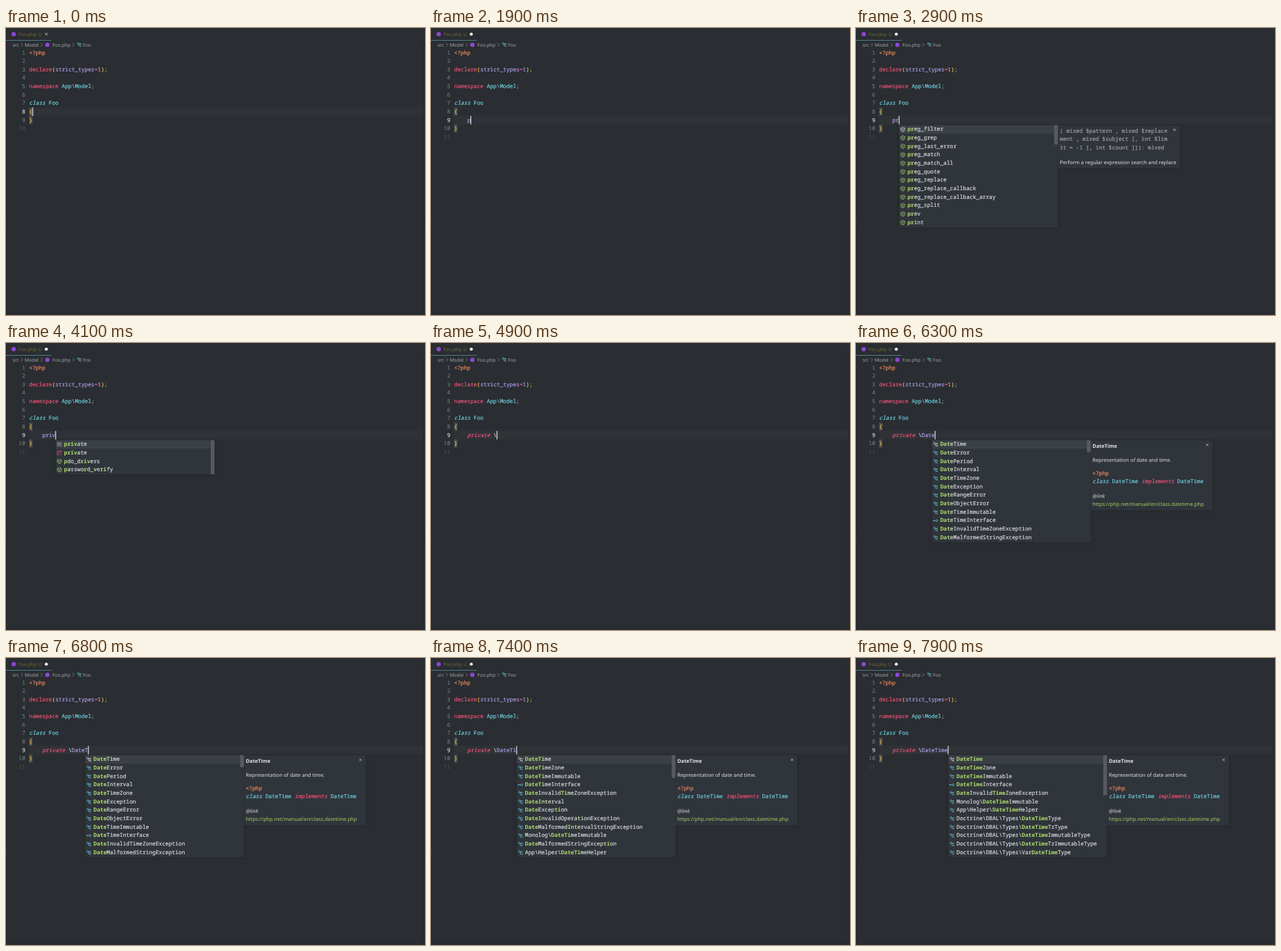
These frames come from a looping animation (626 by 430 pixels, 8 s). An HTML page:

```html
<!DOCTYPE html>
<html lang="en">
<head>
<meta charset="utf-8">
<title>Code completion</title>
<style>
html, body { margin: 0; width: 100%; height: 100%; overflow: hidden; background: #2a2d31; }
svg { display: block; width: 626px; height: 430px; }
text { white-space: pre; text-rendering: geometricPrecision; font: 8.15px "Noto Sans Mono", "DejaVu Sans Mono", monospace; font-variant-ligatures: none; }
tspan { fill: currentColor; stroke: currentColor; stroke-width: .16px; }
.ui { font: 7px "Noto Sans", "Open Sans", sans-serif; }
.doc { font: 7.64px "Noto Sans", "Open Sans", sans-serif; }
.ui tspan, .doc tspan { stroke: none; }
.end { text-anchor: end; }
.r { color: #f4527a; } .R { color: #f4527a; font-style: italic; }
.c { color: #6fd3e3; } .C { color: #6fd3e3; font-style: italic; }
.p { color: #b3a0f2; } .y { color: #f5c84c; } .o { color: #f58f62; }
.d { color: #a3a6a9; } .w { color: #dfe0e1; } .W { color: #e4e5e6; font-weight: bold; }
.I { color: #d3d5d7; font-style: italic; }
.g { color: #a5cf62; } .G { color: #aedd68; font-weight: bold; stroke: none; }
.n { color: #71757a; } .N { color: #d8d9da; } .f { color: #484c50; }
.t { color: #756a35; }
.icon { fill: none; stroke-width: .75; }
.shade { filter: drop-shadow(0 0 2px rgba(0, 0, 0, .18)); }
</style>
</head>
<body>
<svg viewBox="0 0 626 430">
  <g id="frame"></g>
  <g id="scene"></g>
  <rect id="caret" width="1.1" height="12.8" fill="#f4f4f4"/>
  <g id="popup"></g>
</svg>
<script>
const LOOP = 8000, CHAR = 4.89, LEFT = 34.6, LINE = 12.65, ROW = 12.69, LIST_W = 237, DOC_W = 182;
const el = id => document.getElementById(id);
const lineY = n => 36.7 + (n - 1) * LINE;
const rect = (x, y, w, h, fill) => `<rect x="${x}" y="${y}" width="${w}" height="${h}" fill="${fill}"/>`;
const circle = (x, y, r, fill) => `<circle cx="${x}" cy="${y}" r="${r}" fill="${fill}"/>`;
const path = (x, y, d, color) => `<path class="icon" transform="translate(${x} ${y})" d="${d}" stroke="${color}"/>`;

// Runs are separated by "|"; the first letter of each names its colour class.
const label = (x, y, runs, cls = '') => `<text x="${x}" y="${y + 2.8}" class="${cls}">` +
  runs.split('|').map(s => `<tspan class="${s[0]}">${s.slice(1).replace(/</g, '&lt;')}</tspan>`).join('') + '</text>';

const CROSS = 'M-2-2L2 2M2-2L-2 2', CHEVRON = 'M-1.2-2.5L1.2 0L-1.2 2.5';
const ICONS = {
  func: ['M0-3.4L3-1.8V1.7L0 3.4L-3 1.7V-1.8ZM-3-1.8L0-.2L3-1.8M0-.2V3.4', '#a0ca64'],
  cls: ['M-3.2-1.5L-1.6-3.1L-.2-1.7L-1.8-.1ZM-.8-1.2H2M-.1-1.2V2.1H1.4M1.3-.9L2.3-1.9L3.2-1L2.2 0ZM1.3 2.2L2.3 1.2L3.2 2.1L2.2 3.1Z', '#68c3d2'],
  iface: ['M-3.4-.5h1.4v1h-1.4zM-2 0H.4M.4 0a1.4 1.4 0 1 1 2.8 0a1.4 1.4 0 1 1-2.8 0', '#68c3d2'],
  key: ['M-3.3-2.5h4M1.8-2.5h1.6M-3.3-.2h6.6M-3.3 2.2h3M1 2.2h2.4', '#c3c5c8'],
  snip: ['M-3-2.8h6v3M-3-2.8v5.6h3M-1.3-.9h2.8M-1.3 1h1.6M1.5 2.8h1.6', '#f4527a'],
};
const icon = (kind, x, y, color = ICONS[kind][1]) => path(x, y, ICONS[kind][0], color);

// Item names mark matched letters with asterisks.
const item = (kind, name) => ({ kind, runs: name.split('*').map((s, i) => (i % 2 ? 'G' : 'w') + s).filter(s => s[1]).join('|') });
const items = (kind, names) => names.split(' ').map(n => item(kind, n));
const prefix = (n, names) => names.split(' ').map(s => `*${s.slice(0, n)}*${s.slice(n)}`).join(' ');
const classes = list => list.split(' ').map(n => item(n.includes('Interface') ? 'iface' : 'cls', n));

const packList = items('func', prefix(1, 'pack parse_ini_file parse_ini_string parse_str parse_url passthru password_get_info password_hash password_needs_rehash password_verify pathinfo pclose'));
const pregList = items('func', prefix(2, 'preg_filter preg_grep preg_last_error preg_match preg_match_all preg_quote preg_replace preg_replace_callback preg_replace_callback_array preg_split prev print'));
const priList = [...items('func', '*pri*nt *pri*nt_r *pri*ntf'), item('key', '*pri*vate'), item('snip', '*pri*vate'),
  ...items('func', '*pr*eg_f*i*lter *pr*eg_spl*i*t *p*do_d*ri*vers *p*a*r*se_*i*ni_file *p*a*r*se_*i*ni_string *p*asswo*r*d_get_*i*nfo *p*asswo*r*d_ver*i*fy')];
const privateList = s => ['key', 'snip'].map(kind => item(kind, prefix(s.length, 'private')));
const privList = [...privateList('priv'), ...items('func', '*p*do_d*riv*ers *p*asswo*r*d_*v*er*i*fy')];
const dateList = n => classes(prefix(n, 'DateTime DateError DatePeriod DateInterval DateTimeZone DateException DateRangeError DateObjectError DateTimeImmutable DateTimeInterface DateInvalidTimeZoneException DateMalformedStringException'));
const dateTiList = classes('*DateTi*me *DateTi*meZone *DateTi*meImmutable *DateTi*meInterface *Date*Invalid*Ti*meZoneException *DateI*n*t*erval *Date*Excep*ti*on *DateI*nvalidOpera*t*ionException *Date*Malformed*I*n*t*ervalStringException Monolog\\*DateTi*meImmutable *Date*MalformedStringExcep*ti*on App\\Helper\\*DateTi*meHelper');
const dateTimeList = classes('*DateTime* *DateTime*Zone *DateTime*Immutable *DateTime*Interface *Date*Invalid*Time*ZoneException Monolog\\*DateTime*Immutable App\\Helper\\*DateTime*Helper '
  + ['*DateTime*', '*DateTime*Tz', '*DateTime*Immutable', '*DateTime*TzImmutable', 'Var*DateTime*'].map(s => `Doctrine\\DBAL\\Types\\${s}Type`).join(' '));

// Documentation: panel height and lines of [centre y, runs, class].
const funcDoc = (code, summary) => ({ h: 64.5, lines: [...code.map((s, i) => [154 + i * 12.6, 'd' + s]), [201.2, 'w' + summary, 'doc']] });
const pregDoc = funcDoc(['( mixed $pattern , mixed $replace', 'ment , mixed $subject [, int $lim', 'it = -1 [, int $count ]]): mixed'], 'Perform a regular expression search and replace');
const printDoc = funcDoc(['( string $arg ): int'], 'Output a string');
const packDoc = funcDoc(['( string $format [, mixed $args [', ', mixed $... ]]): string'], 'Pack data into binary string');
const dateDoc = { h: 105, lines: [
  [154.3, 'WDateTime', 'doc'], [175, 'wRepresentation of date and time.', 'doc'], [195.2, 'o<?php'],
  [207.6, 'Cclass|c DateTime|R implements|c DateTime'], [229, 'I@link', 'doc'],
  [241.5, 'ghttps://php.net/manual/en/class.datetime.php', 'doc']] };
const tallDoc = { h: 195, lines: [...dateDoc.lines,
  [267, 'I@since', 'doc'], [279.5, 'w5.2', 'doc'], [305, 'I@see', 'doc'], [317.5, 'wDateTimeInterface', 'doc']] };

const popup = (chars, list, doc, bar) => ({ x: 54.6 + chars * CHAR + .2, list, doc, bar });
const pPop = popup(1, packList, packDoc, 18), prPop = popup(2, pregList, pregDoc, 29);
const date = (n, doc = dateDoc) => popup(9 + n, dateList(n), doc, 18);
const dateTi = chars => popup(chars, dateTiList, dateDoc, 34);
const dateTime = chars => popup(chars, dateTimeList, dateDoc, 60);

// [start, typed text, popup]
const steps = [
  [0, null], [1400, ''], [1900, 'p'], [2000, 'p', pPop], [2200, 'pr'], [2900, 'pr', prPop],
  [3500, 'pri', prPop], [3600, 'pri', popup(3, priList, printDoc, 60)],
  [4100, 'priv', popup(4, privList, null, 51)],
  [4200, 'priva', popup(5, privateList('priva'), null, 25)], [4300, 'privat', popup(6, privateList('privat'), null, 25)],
  [4500, 'private '], [4900, 'private \\'], [5200, 'private \\DF', date(1, tallDoc)], [5300, 'private \\DFa'],
  [5800, 'private \\DF'], [6000, 'private \\D'], [6100, 'private \\Da', date(1)], [6200, 'private \\Dat', date(2)],
  [6300, 'private \\Date', date(3)], [6400, 'private \\Date', date(4)], [6800, 'private \\DateT', date(4)],
  [6900, 'private \\DateT', dateTi(14)], [7000, 'private \\DateTi', dateTi(14)], [7400, 'private \\DateTi', dateTi(15)],
  [7500, 'private \\DateTim', dateTime(16)], [7700, 'private \\DateTime', dateTime(16)], [7900, 'private \\DateTime', dateTime(17)],
];

function drawFrame() {
  const code = { 1: 'o<?php', 3: 'rdeclare|y(|pstrict_types|r=|p1|y)|d;', 5: 'rnamespace|c App|d\\|cModel|d;', 7: 'Cclass|c Foo' };
  el('frame').innerHTML = rect(0, 0, 626, 430, '#2a2d31') +
    rect(0, 0, 1, 430, '#212428') + rect(0, 285, 1, 13, '#2a2d31') +
    rect(623, 19, 1, 408, '#25282c') + rect(0, 427, 626, 1, '#25282c') +
    rect(0, 18, 68, 1, '#4c7f8b') +
    circle(11.5, 9.2, 3.2, '#8b47d6') + label(18.8, 9.3, 'tFoo.php', 'ui') + label(48.2, 9.3, 'tU', 'ui') +
    label(10, 25, 'dsrc', 'ui') + label(28, 25, 'dModel', 'ui') + circle(61.8, 25.2, 3.2, '#8b47d6') +
    label(69.3, 25, 'dFoo.php', 'ui') + icon('cls', 109.3, 24.8) + label(115, 25, 'dFoo', 'ui') +
    [23.7, 53.3, 100.7].map(x => path(x, 25.2, CHEVRON, '#8c9094')).join('') +
    Object.entries(code).map(([n, s]) => label(LEFT, lineY(n), s)).join('');
}

function drawScene(typed, dirty) {
  const open = typed !== null, active = open ? 9 : 8, close = open ? 10 : 9;
  let out = rect(LEFT, lineY(active) - 6.2, 588, 12.7, '#2f3236');
  for (let n = 1; n <= close + 1; n++)
    out += label(28.8, lineY(n), (n === active ? 'N' : n > close ? 'f' : 'n') + n, 'end');
  for (const [n, brace] of [[8, '{'], [close, '}']])
    out += rect(LEFT - .2, lineY(n) - 6, 5.2, 12.2, '#4a4d50') + label(LEFT, lineY(n), 'y' + brace);
  if (typed) {
    const [, word, slash, name] = typed.match(/^(\w+ ?)(\\?)(\w*)$/);
    const runs = [(word === 'private ' ? 'R' : 'p') + word, 'w' + slash, 'p' + name];
    out += label(LEFT + 4 * CHAR, lineY(9), runs.join('|'));
  }
  out += dirty ? circle(60.2, 9.2, 2.3, '#f2f2f2') : path(60.2, 9.2, CROSS, '#e0e1e2');
  el('scene').innerHTML = out;
  const column = open ? 4 + typed.length : 1;
  el('caret').setAttribute('x', LEFT + column * CHAR - .1);
  el('caret').setAttribute('y', lineY(active) - 6.2);
}

function drawPopup(p) {
  if (!p) return el('popup').innerHTML = '';
  const { x, list, doc, bar } = p, top = 145.6, docX = x + LIST_W;
  let out = '<g class="shade">' + rect(x, top, LIST_W, list.length * ROW + .6, '#30343b');
  if (doc) out += rect(docX, top, DOC_W, doc.h, '#30343b');
  out += '</g>' + rect(x, top, LIST_W, ROW, '#3b4047') + rect(docX - 5.5, top, 5.5, bar, '#575b60');
  list.forEach(({ kind, runs }, i) => {
    const y = 151.4 + i * ROW;
    out += icon(kind, x + 5.4, y + .5, i ? undefined : '#d6d8da') + label(x + 12.4, y, runs);
  });
  if (doc) {
    out += path(docX + 174.2, 152.6, 'M-1.7-1.7L1.7 1.7M1.7-1.7L-1.7 1.7', '#d6d8da');
    for (const [y, runs, cls] of doc.lines) out += label(docX + 2.8, y, runs, cls);
  }
  el('popup').innerHTML = out;
}

function caretOpacity(t) {
  if (t >= 1400) return 1;
  const fade = start => Math.min(1, Math.max(0, (t - start) / 300));
  return 1 - fade(200) + fade(700) - fade(1200);
}

drawFrame();
const start = performance.now();
let shown = '';
function tick() {
  const t = (performance.now() - start) % LOOP;
  const index = steps.findLastIndex(s => s[0] <= t), dirty = t >= 1500;
  const key = index + ':' + dirty;
  if (key !== shown) {
    shown = key;
    drawScene(steps[index][1], dirty);
    drawPopup(steps[index][2]);
  }
  el('caret').setAttribute('opacity', caretOpacity(Math.floor(t / 100) * 100));
  requestAnimationFrame(tick);
}
tick();
</script>
</body>
</html>
```
